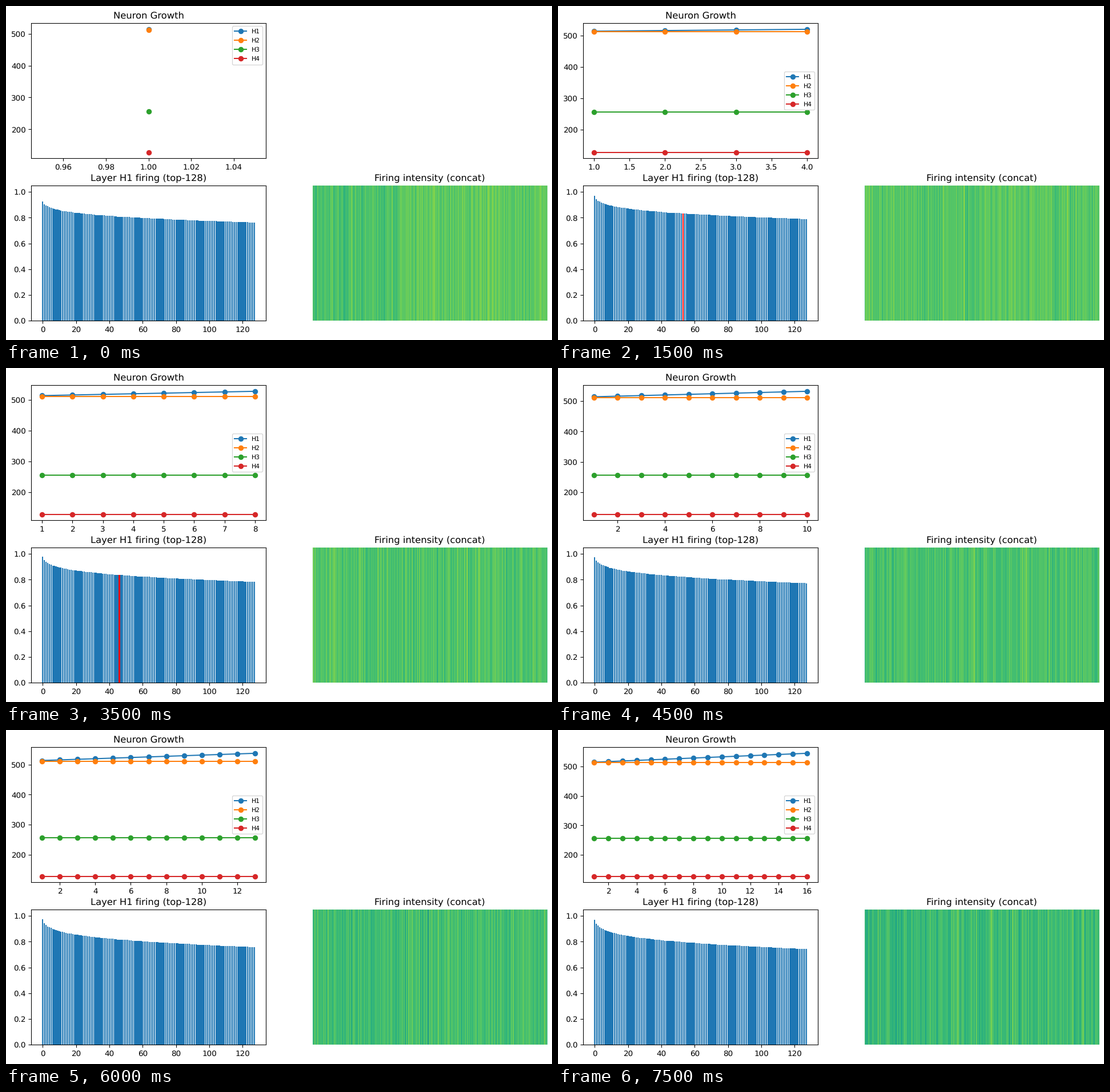
Recreate the animation shown at these times as a matplotlib script. Size 956 by 586 pixels, loop 8000 ms.

```python
import matplotlib.pyplot as plt
import numpy as np
from matplotlib.animation import FuncAnimation

W, H, DPI = 956, 586, 97
EPOCHS, STEP_MS = 16, 500
TOP = 128
NEW_RANK = {4: 53, 8: 46}  # rank of the new neuron when it is in view

plt.rcParams.update({
    "font.family": "DejaVu Sans",
    "text.hinting": "none",
    "axes.titlesize": 12.15,
})


def layer_sizes(epoch):
    return [512 + 2 * epoch, 512, 256, 128]


def bell(n):
    """Descending, evenly spaced quantiles of a near-normal distribution."""
    p = 1 - (np.arange(n) + .5) / n
    return 4.91 * (p ** .14 - (1 - p) ** .14)


def layer_firing(epoch, rng):
    """Firing rates of each layer; the first one is sorted."""
    spread = .07 + .0018 * (epoch - 1)
    level = np.interp(epoch, [1, 5, 16], [.715, .745, .672])
    rest = np.interp(epoch, [1, EPOCHS], [.755, .69])
    sizes = layer_sizes(epoch)

    first = level + spread * bell(sizes[0]) + rng.normal(0, .001, sizes[0])
    others = [rest + spread * rng.permutation(bell(n)) for n in sizes[1:]]
    return [np.clip(v, 0, 1) for v in (np.sort(first)[::-1], *others)]


def draw_growth(ax, epoch):
    xs = np.arange(1, epoch + 1)
    sizes = np.array([layer_sizes(e) for e in xs])
    for i in range(4):
        ax.plot(xs, sizes[:, i], marker="o", label=f"H{i + 1}")
    ax.set_title("Neuron Growth")
    ax.legend(fontsize=8, loc="upper right" if epoch == 1 else "center right")


def draw_firing(ax, rates, new_rank):
    colors = ["red" if k == new_rank else "C0" for k in range(TOP)]
    ax.bar(np.arange(TOP), rates[:TOP], color=colors)
    ax.set_ylim(0, 1.05)
    ax.set_title("Layer H1 firing (top-128)")


def draw_intensity(ax, rates):
    ax.imshow(rates[None, :], aspect="auto", cmap="viridis", vmin=0, vmax=1)
    ax.set_title("Firing intensity (concat)")
    ax.axis("off")


fig, axes = plt.subplots(2, 2, figsize=((W + .01) / DPI, (H + .01) / DPI), dpi=DPI)
fig.subplots_adjust(left=44.4 / W, right=947 / W, top=1 - 30.1 / H,
                    bottom=1 - 552.2 / H, wspace=.2, hspace=.2)
(growth, blank), (firing, intensity) = axes
blank.axis("off")


def update(i):
    epoch = i + 1
    rng = np.random.default_rng(100 + epoch)
    for ax in (growth, firing, intensity):
        ax.cla()
    first, *others = layer_firing(epoch, rng)
    draw_growth(growth, epoch)
    draw_firing(firing, first, NEW_RANK.get(epoch))
    draw_intensity(intensity, np.concatenate([rng.permutation(first), *others]))


anim = FuncAnimation(fig, update, frames=EPOCHS, interval=STEP_MS,
                     repeat=True, repeat_delay=0)
plt.show()
```
